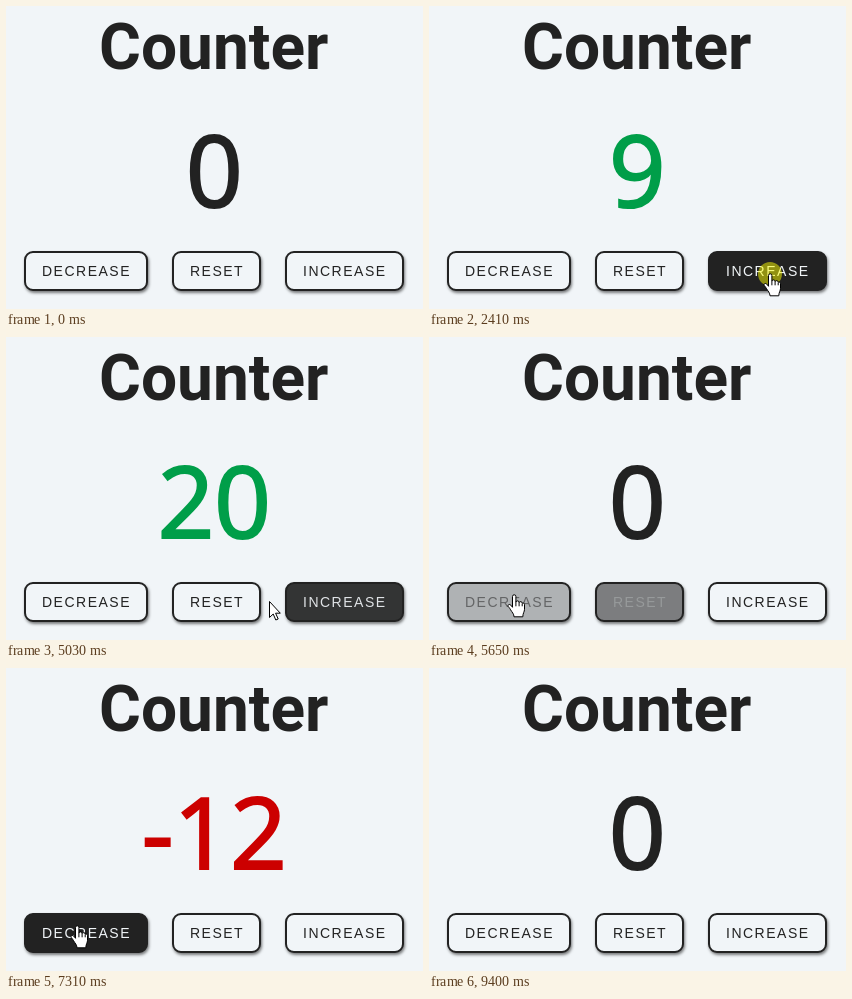
Animation of 417 by 303 pixels, one loop 9.55 s. Source, as an HTML page:

```html
<!DOCTYPE html>
<html lang="en">
<head>
<meta charset="utf-8">
<title>Counter</title>
<style>
  html, body { margin: 0; width: 100%; height: 100%; overflow: hidden; background: #f1f5f8; }
  #stage { position: relative; width: 417px; height: 303px; overflow: hidden; }
  svg { position: absolute; left: 0; top: 0; width: 417px; height: 303px; }
  .title { font: 700 64px Roboto, sans-serif; fill: #222; }
  .value { font: 400 99px "Open Sans", sans-serif; text-anchor: middle; stroke-width: 2.2px; }
  .btn {
    position: absolute; top: 245px; height: 40px; box-sizing: border-box;
    padding-left: 16px; border: 2px solid #222; border-radius: 9px;
    box-shadow: 1px 2px 3px rgba(0, 0, 0, .5);
    font: 14px/36px "Liberation Sans", Arial, sans-serif;
    letter-spacing: 1.5px; white-space: nowrap;
  }
</style>
</head>
<body>
<div id="stage">
  <div class="btn" style="left:18px;width:124px">DECREASE</div>
  <div class="btn" style="left:166px;width:89px">RESET</div>
  <div class="btn" style="left:279px;width:119px">INCREASE</div>
  <svg viewBox="0 0 417 303">
    <text class="title" x="93" y="63">Counter</text>
    <text class="value" id="value" x="208.3" y="201.4">0</text>
    <g id="cursor">
      <circle id="ring" r="12" fill="#ff0" fill-opacity=".5"/>
      <path id="arrow" transform="translate(-1 0)" d="M.5.5V16.5l3.7-3.5 2.6 6 2.4-1-2.6-5.8H11.3z" fill="#fff" stroke="#000"/>
      <g id="hand" transform="translate(-1.5 -.7)" stroke="#000" stroke-linejoin="round">
        <path fill="#fff" d="M0 13V2.2a1.7 1.7 0 0 1 3.4 0V8a1.6 1.6 0 0 1 3.2.4a1.6 1.6 0 0 1 3.1.6a1.5 1.5 0 0 1 2.3 1V15c0 2.5-1.7 4-1.7 7.5H1.5c0-3-2-4.5-3.4-7-1-1.8-1.7-2.5-2.5-3.5-.5-1.8 1.3-2.5 2.7-1.2z"/>
        <path fill="none" d="M3.4 8v4M6.6 8.5V12M9.7 9.3V12"/>
      </g>
    </g>
  </svg>
</div>
<script>
const LOOP = 9550, STEP = 80, FADE = 300, ENTER = 150;
const $ = id => document.getElementById(id);

const buttons = [...document.querySelectorAll('.btn')].map(el => ({
  el, left: el.offsetLeft, right: el.offsetLeft + el.offsetWidth
}));

// cursor moves: start, end, x, y
const moves = [
  [0, ENTER, 327, 300],
  [ENTER, 390, 341, 268],
  [4820, 5205, 205, 261],
  [5350, 5650, 71, 258],
  [7580, 7800, 186, 263],
  [8935, 9180, 205, 312]
];

// click runs: first release, gap, count, change (0 resets)
const runs = [
  [790, 0, 1, 1],
  [1165, 155, 3, 1],
  [1706, 144, 7, 1],
  [2945, 267, 4, 1],
  [3980, 195, 5, 1],
  [5350, 0, 1, 0],
  [5750, 139, 13, -1],
  [8840, 0, 1, 0]
];
const clicks = runs.flatMap(([first, gap, count, change]) =>
  Array.from({ length: count }, (_, i) => {
    const up = first + i * gap;
    return { down: up - (count > 1 ? 85 : 170), up, change };
  }));

const clamp = v => Math.min(1, Math.max(0, v));
const mix = (a, b, k) => a + (b - a) * k;
const ease = k => k * k * (3 - 2 * k);
const shade = k => `rgb(${mix(241, 34, k)},${mix(245, 34, k)},${mix(248, 34, k)})`;
const show = (el, on) => el.setAttribute('visibility', on ? 'visible' : 'hidden');

function locate(t) {
  let x = 0, y = 320;
  for (const [start, end, toX, toY] of moves) {
    const k = ease(clamp((t - start) / (end - start)));
    x = mix(x, toX, k);
    y = mix(y, toY, k);
  }
  return { x, y };
}

const hit = ({ x, y }, b) => y >= 245 && y < 285 && x >= b.left && x < b.right;

// linear hover fades, followed from the start of the loop
function hoverLevels(t) {
  const levels = buttons.map(() => 0), dt = 5;
  for (let u = ENTER; u < t; u += dt) {
    const p = locate(u);
    buttons.forEach((b, i) => {
      levels[i] = clamp(levels[i] + (hit(p, b) ? dt : -dt) / FADE);
    });
  }
  return levels;
}

function drawValue(t) {
  let n = 0;
  for (const c of clicks) if (t >= c.up) n = c.change && n + c.change;
  const color = n > 0 ? '#009e49' : n < 0 ? '#c00' : '#222';
  $('value').textContent = n;
  $('value').setAttribute('fill', color);
  $('value').setAttribute('stroke', color);
}

function drawCursor(t, s) {
  const p = locate(s);
  const seen = s >= ENTER, over = seen && buttons.some(b => hit(p, b));
  show($('arrow'), seen && !over);
  show($('hand'), over);
  show($('ring'), clicks.some(c => t >= c.down && t < c.up));
  $('cursor').setAttribute('transform', `translate(${Math.round(p.x)} ${Math.round(p.y)})`);
}

let last;
function draw(t) {
  // motion and fades advance in held steps
  const s = ENTER + Math.floor((t - ENTER + 5) / STEP) * STEP;
  if (s !== last) {
    hoverLevels(s).forEach((k, i) => {
      buttons[i].el.style.background = shade(k);
      buttons[i].el.style.color = shade(1 - k);
    });
    last = s;
  }
  drawValue(t);
  drawCursor(t, s);
}

const start = performance.now();
function tick() {
  draw((performance.now() - start) % LOOP);
  requestAnimationFrame(tick);
}
draw(0);
requestAnimationFrame(tick);
</script>
</body>
</html>
```
